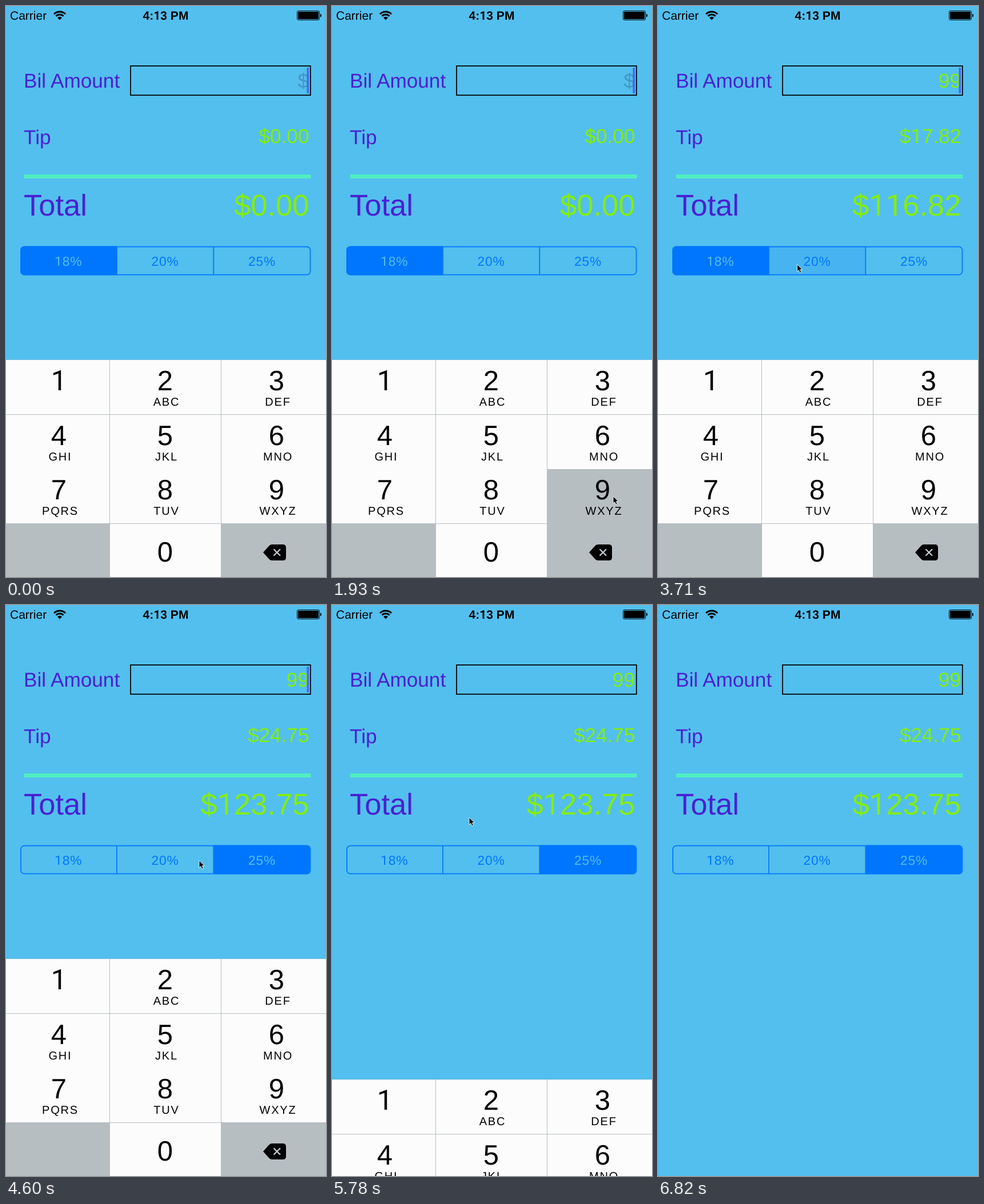
An HTML page for the animation above (7.51 s loop, 560x1000 px).

```html
<!DOCTYPE html>
<html lang="en">
<head>
<meta charset="utf-8">
<title>Tip calculator</title>
<style>
  html, body { margin: 0; width: 100%; height: 100%; overflow: hidden; background: #53bfee; }
  svg { display: block; width: 100%; height: 100%; }
  text { font-family: "Liberation Sans", Arial, sans-serif; text-rendering: geometricPrecision; white-space: pre; }
  .one { font-family: Roboto, sans-serif; }
  .label { fill: #4a20d2; }
  .amount { fill: #84ee0a; text-anchor: end; font-kerning: none; }
  .empty { fill: #4497c2; }
  .mid { font-size: 35.2px; }
  .big { font-size: 52.5px; }
  .status { font-size: 21px; }
  .line { fill: none; stroke: #0076ff; stroke-width: 1.75; }
  .seg text { font-size: 22.75px; letter-spacing: .9px; text-anchor: middle; fill: #0076ff; }
  .seg rect { fill: #0076ff; fill-opacity: 0; }
  .seg.pressed rect { fill-opacity: .15; }
  .seg.on rect { fill-opacity: 1; }
  .seg.on text { fill: #53bfee; }
  .key rect { fill: #fcfcfc; }
  .key.pressed rect { fill: #b6bec2; }
  .key text { text-anchor: middle; }
  .digit { font-size: 49px; }
  .letters { font-size: 20px; letter-spacing: 1.8px; }
</style>
</head>
<body>
<svg viewBox="0 0 560 1000">
  <defs>
    <clipPath id="round"><rect x="25" y="420.5" width="508.5" height="51" rx="7"/></clipPath>
  </defs>
  <rect width="560" height="1000" fill="#53bfee"/>

  <text class="status" x="7" y="24">Carrier</text>
  <g fill="none" stroke="#000" stroke-width="2.9">
    <path d="M84 14.2A14 14 0 0 1 104 14.2"/>
    <path d="M87.5 17.7A9.2 9.2 0 0 1 100.5 17.7"/>
    <path d="M94 24.5L90 20.5A5.6 5.6 0 0 1 98 20.5Z" fill="#000" stroke="none"/>
  </g>
  <text id="clock" class="status" x="279.5" y="24" font-weight="bold" text-anchor="middle"></text>
  <rect x="509.5" y="8.5" width="39" height="16" rx="2.5" fill="none" stroke="#000"/>
  <rect x="511" y="10" width="36" height="13" rx="1"/>
  <path d="M550 13.5Q552 14 552 16.5T550 19.5Z"/>

  <text class="label mid" x="31" y="143">Bil Amount</text>
  <rect x="218" y="105" width="314.8" height="51.2" fill="none" stroke="#000" stroke-width="1.75"/>
  <text id="bill" class="amount mid" x="530" y="143"></text>
  <rect id="caret" x="526.5" y="108" width="3.5" height="45" fill="#416bf0"/>
  <text class="label mid" x="31" y="242">Tip</text>
  <text id="tip" class="amount mid" x="530.5" y="239.5"></text>
  <rect x="32" y="295" width="501.5" height="7" fill="#50efc0"/>
  <text class="label big" x="31" y="366.7">Total</text>
  <text id="total" class="amount big" x="530.5" y="366.7"></text>

  <g id="segments" clip-path="url(#round)"></g>
  <rect class="line" x="26" y="421.5" width="506.5" height="49.2" rx="6"/>

  <g id="keyboard">
    <rect y="619.6" width="560" height="381" fill="#b6bec2"/>
    <g id="keys"></g>
    <path d="M450 957L460.5 945.2Q462.5 943 466 943H484.5Q490 943 490 948.5V965.5Q490 971 484.5 971H466Q462.5 971 460.5 968.8Z"/>
    <path d="M468.5 951.2L480 962.8M480 951.2L468.5 962.8" stroke="#c6ccd0" stroke-width="2.3"/>
  </g>

  <path id="cursor" d="M.5.5V13.3L3.4 10.6L5.4 15.3L7.8 14.3L5.8 9.7H9.8Z" stroke="#fff" stroke-width=".9"/>
</svg>

<script>
const LOOP = 7510;
const STEP = 148.3;        // screen refresh interval, ms
const TYPE_DELAY = 140;    // from key press to the new digit
const BLINK = 960;         // caret period
const EDIT_END = 5600;     // the field loses focus
const SLIDE_START = 5681.6;
const SLIDE_RATE = 18.26;  // critically damped spring, 1/s
const EXIT = 6780;         // the pointer leaves

// Places the pointer rests at or turns
const stops = [
  { x: 549, y: 407, arrive: 1180, leave: 1340 },
  { x: 525, y: 853, arrive: 1480, leave: 1480 },
  { x: 491.5, y: 858, arrive: 1770, leave: 2670 },
  { x: 168, y: 456, arrive: 3260, leave: 3260 },
  { x: 243, y: 452, arrive: 3550, leave: 3850 },
  { x: 390, y: 450, arrive: 4150, leave: 4300 },
  { x: 337.5, y: 447, arrive: 4590, leave: 4600 },
  { x: 239.5, y: 371.5, arrive: 5330, leave: 6230 },
  { x: 182, y: 632, arrive: 6670, leave: EXIT },
];

const taps = [
  { on: "9", down: 1920, up: 2220 },
  { on: "9", down: 2370, up: 2660 },
  { on: "20%", down: 3700, up: 3850 },
  { on: "25%", down: 4290, up: 4440 },
];

const rates = [18, 20, 25];
const letters = ["", "ABC", "DEF", "GHI", "JKL", "MNO", "PQRS", "TUV", "WXYZ"];
const columns = [92.5, 278.5, 473.5];

const $ = id => document.getElementById(id);
const clamp = v => Math.min(1, Math.max(0, v));
const ease = p => p * p * (3 - 2 * p);

// A plain "1" without a foot
const digits = s => s.replace(/1/g, '<tspan class="one">1</tspan>');

function put(el, s) {
  if (el.dataset.text === s) return;
  el.dataset.text = s;
  el.innerHTML = digits(s);
}

function segment(rate, i) {
  const w = 169.4, x = 24.5 + w * i;
  const divider = i ? `<path class="line" d="M${x} 421V471"/>` : "";
  return `<g class="seg" data-name="${rate}%">
    <rect x="${x}" y="420" width="${w}" height="52"/>${divider}
    <text x="${x + w / 2}" y="454.5">${digits(rate + "%")}</text></g>`;
}

function key(digit, sub, col, row, drop = 0) {
  const x = 195 * col - 13, y = Math.round(620 + 95.6 * row);
  const base = 673 + 95.5 * row + drop;
  return `<g class="key" data-name="${digit}">
    <rect x="${x}" y="${y}" width="194" height="95"/>
    <text class="digit" x="${columns[col]}" y="${base}">${digits(String(digit))}</text>
    <text class="letters" x="${columns[col] + 2.5}" y="${base + 27}">${sub}</text></g>`;
}

$("segments").innerHTML = rates.map(segment).join("");
$("keys").innerHTML = letters.map((sub, i) => key(i + 1, sub, i % 3, Math.floor(i / 3))).join("")
  + key(0, "", 1, 3, 13);
put($("clock"), "4:13 PM");
const buttons = [...document.querySelectorAll(".seg, .key")];

function pointer(t) {
  const i = stops.findLastIndex(s => s.arrive <= t);
  if (i < 0 || t >= EXIT) return null;
  const a = stops[i], b = stops[i + 1];
  if (!b) return [a.x, a.y];
  const p = ease(clamp((t - a.leave) / (b.arrive - a.leave)));
  return [a.x + (b.x - a.x) * p, a.y + (b.y - a.y) * p];
}

function caret(t, typedAt) {
  if (t > EDIT_END) return 0;
  const p = (t - typedAt) / BLINK % 1;
  return clamp(Math.max((.53 - p) / .13, (p - .85) / .15));
}

function slide(t) {
  const wt = SLIDE_RATE * Math.max(0, t - SLIDE_START) / 1000;
  const part = 1 - Math.exp(-wt) * (1 + wt);
  return part > .99 ? 381 : 380 * part;
}

function draw(now) {
  const t = Math.floor((now % LOOP + 6) / STEP) * STEP;
  const typed = taps.filter(p => !p.on.endsWith("%") && p.down + TYPE_DELAY <= t);
  const picked = taps.findLast(p => p.on.endsWith("%") && p.up <= t)?.on ?? "18%";
  const held = taps.find(p => p.down <= t && t < p.up)?.on;
  const bill = typed.map(p => p.on).join("");
  const tip = Number(bill) * parseInt(picked) / 100;

  put($("bill"), bill || "$");
  $("bill").classList.toggle("empty", !bill);
  put($("tip"), "$" + tip.toFixed(2));
  put($("total"), "$" + (Number(bill) + tip).toFixed(2));
  $("caret").setAttribute("opacity", caret(t, typed.length ? typed.at(-1).down + TYPE_DELAY : 0));

  for (const b of buttons) {
    b.classList.toggle("on", b.dataset.name === picked);
    b.classList.toggle("pressed", b.dataset.name === held);
  }
  $("keyboard").setAttribute("transform", `translate(0 ${slide(t)})`);

  const spot = pointer(t);
  $("cursor").setAttribute("visibility", spot ? "visible" : "hidden");
  if (spot) $("cursor").setAttribute("transform", `translate(${spot})`);
}

const begin = performance.now();
function tick() {
  draw(performance.now() - begin);
  requestAnimationFrame(tick);
}
tick();
</script>
</body>
</html>
```
